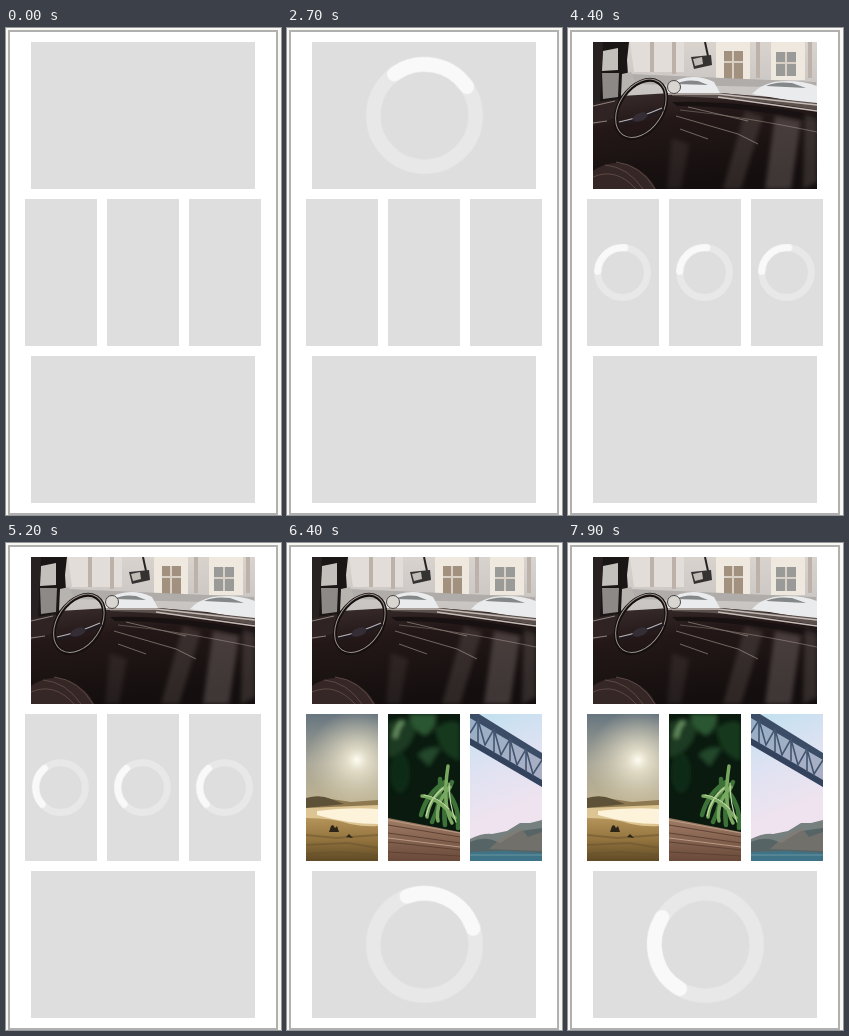
Recreate the animation shown at these times as an HTML page. Size 275 by 487 pixels, loop 8 s.

```html
<!DOCTYPE html>
<html lang="en">
<head>
<meta charset="utf-8">
<title>Image loading placeholders</title>
<style>
  html, body { margin: 0; width: 100%; height: 100%; overflow: hidden; background: #f8f7f2; }
  .stage { display: block; width: 100vw; height: 100vh; }
  .slot { fill: #dedede; }
  .track, .arc { fill: none; stroke: #e8e8e8; stroke-width: 14.5; }
  .arc { stroke: #f9f9f9; stroke-linecap: round; stroke-dasharray: 92 268; animation: turn 8s steps(80, end) infinite; }
  .at-1000, .at-3800, .at-6300, .at-6400 { animation: 8s step-end infinite; }
  .at-1000 { animation-name: at-1000; }
  .at-3800 { animation-name: at-3800; }
  .at-6300 { animation-name: at-6300; }
  .at-6400 { animation-name: at-6400; }
  @keyframes turn { from { transform: rotate(-108.5deg); } to { transform: rotate(3039.5deg); } }
  @keyframes at-1000 { from { opacity: 0; } 12.5%, to { opacity: 1; } }
  @keyframes at-3800 { from { opacity: 0; } 47.5%, to { opacity: 1; } }
  @keyframes at-6300 { from { opacity: 0; } 78.75%, to { opacity: 1; } }
  @keyframes at-6400 { from { opacity: 0; } 80%, to { opacity: 1; } }
</style>
</head>
<body>
<svg class="stage" viewBox="0 0 275 487">
  <defs>
    <linearGradient id="street" x2="0" y2="1">
      <stop stop-color="#d9d3ce"/><stop offset="1" stop-color="#c2bfbd"/>
    </linearGradient>
    <linearGradient id="dash" x2=".3" y2="1">
      <stop stop-color="#3a2f2d"/><stop offset=".35" stop-color="#231817"/><stop offset="1" stop-color="#140e0e"/>
    </linearGradient>
    <linearGradient id="dusk" x2="0" y2="1">
      <stop stop-color="#66757f"/><stop offset=".5" stop-color="#aaa899"/><stop offset="1" stop-color="#c3b48d"/>
    </linearGradient>
    <radialGradient id="sun">
      <stop stop-color="#fffdf2"/><stop offset=".22" stop-color="#efe9d3" stop-opacity=".8"/><stop offset="1" stop-color="#d8cfb4" stop-opacity="0"/>
    </radialGradient>
    <linearGradient id="sand" x2="0" y2="1">
      <stop stop-color="#b4945a"/><stop offset=".5" stop-color="#94743e"/><stop offset="1" stop-color="#5f4a25"/>
    </linearGradient>
    <linearGradient id="wood" x2="0" y2="1">
      <stop stop-color="#a07d66"/><stop offset="1" stop-color="#69493a"/>
    </linearGradient>
    <linearGradient id="sky" x2=".2" y2="1">
      <stop stop-color="#bfe0f0"/><stop offset=".4" stop-color="#dfe2f2"/><stop offset=".75" stop-color="#efe3ef"/>
    </linearGradient>
    <filter id="soft"><feGaussianBlur stdDeviation="2.2"/></filter>
  </defs>

  <rect x="3" y="3" width="268" height="483" fill="#fff" stroke="#b0b0b0" stroke-width="2"/>
  <g class="slot">
    <rect x="25" y="14" width="224" height="147"/>
    <rect x="19" y="171" width="72" height="147"/>
    <rect x="101" y="171" width="72" height="147"/>
    <rect x="183" y="171" width="72" height="147"/>
    <rect x="25" y="328" width="224" height="147"/>
  </g>

  <!-- spinners -->
  <g class="at-1000">
    <g transform="translate(137.5 87.5)"><circle class="track" r="51.2"/><circle class="arc" r="51.2" pathLength="360"/></g>
  </g>
  <g class="at-3800">
    <g transform="translate(54.5 244.5) scale(.485)"><circle class="track" r="51.2"/><circle class="arc" r="51.2" pathLength="360"/></g>
    <g transform="translate(136.5 244.5) scale(.485)"><circle class="track" r="51.2"/><circle class="arc" r="51.2" pathLength="360"/></g>
    <g transform="translate(218.5 244.5) scale(.485)"><circle class="track" r="51.2"/><circle class="arc" r="51.2" pathLength="360"/></g>
  </g>
  <g class="at-6400">
    <g transform="translate(137.5 401.5)"><circle class="track" r="51.2"/><circle class="arc" r="51.2" pathLength="360"/></g>
  </g>

  <!-- car interior -->
  <g class="at-3800"><svg x="25" y="14" width="224" height="147" viewBox="25 14 224 147">
    <rect x="25" y="14" width="224" height="70" fill="url(#street)"/>
    <path d="M62 14h54v30H66z" fill="#e2ddd8"/>
    <path d="M148 14h34v38h-34zM203 14h34v38h-34z" fill="#efe8df"/>
    <path d="M156 23h19v28h-19z" fill="#a3917f"/>
    <path d="M208 24h20v24h-20z" fill="#9a9a99"/>
    <path d="M165 23v28M156 34h19M218 24v24M208 35h20" stroke="#d8cfc5" stroke-width="2"/>
    <path d="M84 14v30M106 14v32M190 14v36M242 14v36" stroke="#bdb2a9" stroke-width="4"/>
    <path d="M62 46l186 8v6l-186-4z" fill="#b0aca9"/>
    <path d="M96 65q3-10 16-14 18-5 34 3l6 11v4zM184 66q8-9 22-12 24-3 43 4v20z" fill="#eaebec"/>
    <path d="M108 56q9-5 22-3l10 4zM198 58q10-5 26-3l14 5z" fill="#858889"/>
    <path d="M25 74l28-6 50-3 48 0 50 4 48 8v84H25z" fill="url(#dash)"/>
    <path d="M104 65l50 0 95 10v7q-70-12-145-14z" fill="#5b504c"/>
    <path d="M100 66l50 0 99 11M150 69l99 14" fill="none" stroke="#c5bcb7" stroke-width="1.3"/>
    <path d="M104 74q70-2 145 14v7q-70-17-140-17z" fill="#171111"/>
    <path d="M112 82q60 6 137 22" fill="none" stroke="#5e514d" stroke-width="1.2"/>
    <path d="M108 88l62 18 20 10M112 101l28 10M120 79l60 14" fill="none" stroke="#887b74" stroke-width=".8"/>
    <path d="M25 14h36l-2 18 2 30-12 14-24 12z" fill="#1a1615"/>
    <path d="M35 23l15-3 0 22-16 1z" fill="#c3c0bc"/>
    <path d="M34 45h17l-1 24-15 2z" fill="#8c8987"/>
    <path d="M54 46l9-2 6 14-16 10z" fill="#b7b3af"/>
    <path d="M25 14h10l-3 62h-7z" fill="#272221"/>
    <path d="M25 75l25-4v18l-25 8z" fill="#2f2423"/>
    <path d="M25 95l14-2M25 78l22-5" stroke="#8d817b"/>
    <path d="M25 143q18-13 39-5 17 8 24 23H25z" fill="#352726"/>
    <path d="M25 149q23-10 43 12M37 137q23 2 38 24M48 134q25 3 39 27" fill="none" stroke="#5c4844"/>
    <g fill="#e9d9d4" filter="url(#soft)">
      <path d="M177 83l18 6-22 72h-18z" opacity=".12"/>
      <path d="M207 88l26 5-10 68h-26z" opacity=".2"/>
      <path d="M237 86l12 4v64l-14 7z" opacity=".14"/>
      <path d="M104 110l17 6-8 45h-14z" opacity=".08"/>
    </g>
    <circle cx="106" cy="59" r="6.5" fill="#d9d6d2" stroke="#4b4745"/>
    <g fill="none" transform="rotate(34 73 81)">
      <ellipse cx="73" cy="81" rx="21.5" ry="32" stroke="#15100f" stroke-width="4"/>
      <ellipse cx="72.5" cy="80.5" rx="21.5" ry="32" stroke="#9d938d"/>
    </g>
    <path d="M51 94q20-7 44-15l1 4q-21 11-44 14z" fill="#211b20"/>
    <path d="M51 94q20-4 43-14" fill="none" stroke="#b9b3b5" stroke-width="1.2"/>
    <ellipse cx="72" cy="89" rx="8" ry="4" fill="#352d35" transform="rotate(-20 72 89)"/>
    <path d="M137 14l3 14" fill="none" stroke="#272322" stroke-width="2"/>
    <path d="M123 29l20-2 1 10-18 4z" fill="#353232"/>
    <path d="M125 31l9-2 1 7-8 2z" fill="#c1bcb5"/>
  </svg></g>

  <!-- vegetables -->
  <g class="at-6300"><svg x="101" y="171" width="72" height="147" viewBox="101 171 72 147">
    <rect x="101" y="171" width="72" height="147" fill="#0a1a0f"/>
    <g filter="url(#soft)">
      <path d="M101 180q20-10 28 5-4 24-28 30z" fill="#1a3a20"/>
      <path d="M122 171h27q2 14-11 22-14-6-16-22z" fill="#2c5730"/>
      <ellipse cx="113" cy="230" rx="10" ry="20" fill="#102c19"/>
      <path d="M148 185q17-11 25-4v37q-22-6-25-33z" fill="#17391f"/>
      <path d="M108 195q2-12 8-17" fill="none" stroke="#6d9866" stroke-width="4"/>
      <path d="M130 212q10-11 24-7l-12 19z" fill="#21462a"/>
    </g>
    <g fill="none" stroke-linecap="round" stroke-width="4.5">
      <path d="M134 272q6-22 24-33M145 279q10-20 8-43M158 282q-3-24 7-43M171 285q2-20-10-36" stroke="#3c7137"/>
      <path d="M140 274q2-18 18-30M151 278q-3-18 12-34M165 280q-10-17-4-57M135 253q15 1 33 22" stroke="#79a860" stroke-width="3.5"/>
      <path d="M139 273q4-18 17-28M162 240q0 21 7 39M137 252q14 2 25 14" stroke="#c2d9a4" stroke-width="1.2"/>
    </g>
    <path d="M101 275l72 14v29h-72z" fill="url(#wood)"/>
    <path d="M101 282l72 12M101 290l72 10M101 299l72 8M101 309l72 4" stroke="#5d4234"/>
    <path d="M101 277l72 13M101 295l72 9" stroke="#b99b86"/>
  </svg></g>

  <g class="at-6400">
    <!-- beach -->
    <svg x="19" y="171" width="72" height="147" viewBox="19 171 72 147">
      <rect x="19" y="171" width="72" height="100" fill="url(#dusk)"/>
      <circle cx="70" cy="217" r="50" fill="url(#sun)"/>
      <path d="M19 256q14-3 25 0l20 3 27-2v12H19z" fill="#8d7850"/>
      <path d="M19 255q14-4 25 1l13 5-38 4z" fill="#5d5137"/>
      <path d="M19 265l72-3v25l-72-5z" fill="#dcc592"/>
      <path d="M30 268q30-4 61-2v15q-30 0-61-9z" fill="#fdf3da"/>
      <path d="M19 275q28 0 44 6 15 3 28 2v35H19z" fill="url(#sand)"/>
      <path d="M19 292l30 3 42-3M19 302l42-2 30 5M19 311l32-2 40 3" fill="none" stroke="#675331" stroke-width="2" opacity=".5"/>
      <path d="M42 289l2-6 2-1 2 3 2-2 2 6zM59 294l3-3 4 4z" fill="#2d2418"/>
    </svg>

    <!-- bridge -->
    <svg x="183" y="171" width="72" height="147" viewBox="183 171 72 147">
      <rect x="183" y="171" width="72" height="147" fill="url(#sky)"/>
      <path d="M183 171h6l66 43v30l-72-44z" fill="#6d7f9a" opacity=".5"/>
      <path d="M183 171h9l63 39v7l-72-42z" fill="#3b4c66"/>
      <path d="M183 195l72 42v7l-72-42z" fill="#33435e"/>
      <path d="M183 190l8-13 7 25 9-16 7 26 9-16 7 26 9-16 7 25 9-14M191 177v23M207 187v22M223 198v20M239 209v20" fill="none" stroke="#43546f" stroke-width="1.6"/>
      <path d="M183 296q12-6 22-5l15-3 13-8 10 0 12-3v35h-72z" fill="#76807f"/>
      <path d="M183 299q15-7 30 1l20-12 22-3v25h-72z" fill="#566466"/>
      <path d="M202 306q15-15 32-21l7 9 14-5v19z" fill="#86786f" opacity=".6"/>
      <path d="M183 309l34-1 38 2v8h-72z" fill="#3f7488"/>
      <path d="M183 312h72" stroke="#69959f"/>
    </svg>
  </g>
</svg>
</body>
</html>
```
